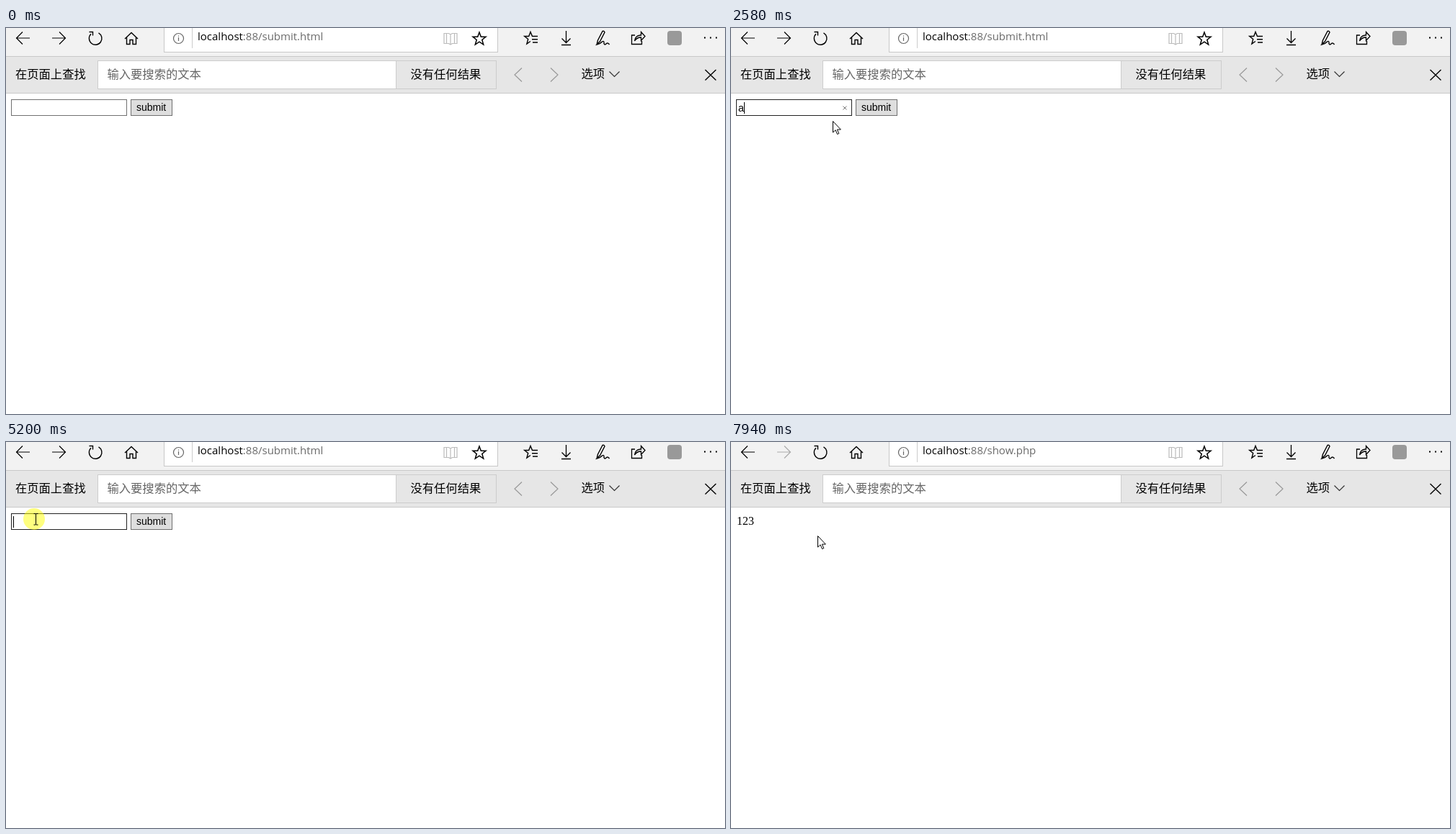
Write an HTML page that moves like this. It is 998 by 536 pixels and loops after 8 s.

```html
<!DOCTYPE html>
<html lang="zh">
<head>
<meta charset="utf-8">
<title>Form demo</title>
<style>
html, body { margin: 0; width: 100%; height: 100%; overflow: hidden; background: #fff; }
svg { display: block; width: 998px; height: 536px; }
text { white-space: pre; }
.ui { font: 15px "Open Sans", sans-serif; }
.zh { font: 16.3px "Noto Sans CJK SC", "Noto Sans CJK", sans-serif; }
.form { font: 14.4px "Liberation Sans", Arial, sans-serif; }
.page { font: 16px "Liberation Serif", serif; }
.icon { fill: none; stroke: #000; stroke-width: 1.2; }
.popup { filter: drop-shadow(0 2px 3px #0004); }
</style>
</head>
<body>
<svg viewBox="0 0 998 536">
  <!-- toolbar -->
  <rect width="998" height="39" fill="#f2f2f2"/>
  <rect y="39" width="998" height="52" fill="#c9c9c9"/>
  <rect y="40" width="998" height="50" fill="#e6e6e6"/>
  <rect id="backHover" x=".5" y="-5.5" width="47" height="43" fill="#dadada" stroke="#b0b0b0"/>
  <rect x="219.5" y="-5.5" width="463" height="39" fill="#fff" stroke="#c8c8c8"/>
  <path d="M258.5 0V28" stroke="#ccc"/>
  <g class="icon">
    <path d="M33 14H14.5M23 5.5L14.5 14l8.500 8.500"/>
    <path id="forward" d="M64 14H82.500M74 5.500l8.500 8.500-8.500 8.500"/>
    <path d="M128.500 6.800A8.800 8.800 0 1 1 118 8.200M115.500 5.500h5v5" stroke-width="1.400"/>
    <path d="M165 15l9-8.500 9 8.500M167.500 13v9.500h4.500v-6h4v6h4.500V13" stroke-width="1.400"/>
    <g stroke="#666"><circle cx="239.500" cy="14.500" r="7"/><path d="M239.500 13v5M239.500 10.500v1.300"/></g>
    <path d="M608 7.500h6.500l2.500 1.500 2.500-1.500h6.500v14h-6.500l-2.500 1.500-2.500-1.500H608zM617 9v14M611.500 8v13M622.500 8v13" stroke="#bbb"/>
    <path d="M657 6l2.300 6.200h6.700l-5.200 4.300 1.900 6.500-5.700-3.800-5.700 3.800 1.900-6.500-5.200-4.300h6.700z" stroke-width="1.500"/>
    <path d="M738 11.500H730.500L728 5.500l-2.300 6h-6l5 4-1.800 6.500 5-3.500M730 15.800h8M731 20h7" stroke-width="1.400"/>
    <path d="M777.500 4v16M771.500 14.500l6 6 6-6M771 23.500h13" stroke-width="1.300"/>
    <path d="M820 23l1.500-6 6.500-12.500q2-1 3 1.500L824.500 18.500 820 23q5-1 7.500-4 3-2 2.500 2.500 1 3 3.500 0 2-1.500 4 1.500" stroke-width="1.400"/>
    <path d="M873 10h-4.500v12.500h14V18M872.500 18q1-7.500 8-8h1V5.500l5.500 6-5.500 6V13q-6 0-9 5z" stroke-width="1.300"/>
    <path d="M716 55.500L706 65l10 9.500M756 55.500l10 9.500-10 9.500" stroke="#999"/>
    <path d="M837.500 60.500l7 7 7-7" stroke="#333"/>
    <path d="M970.500 58l15 14.500m0-14.500l-15 14.500" stroke-width="1.400"/>
  </g>
  <rect x="918" y="4" width="20" height="20" rx="4" fill="#999"/>
  <path d="M969 13.500h2m6 0h2m6 0h2" stroke="#000" stroke-width="2"/>
  <text class="ui" x="266" y="17">localhost<tspan id="path" fill="#6b6b6b"></tspan></text>

  <!-- find bar -->
  <rect x="127.500" y="45.500" width="414" height="39" fill="#fff" stroke="#ccc"/>
  <rect x="541.500" y="45.500" width="139" height="39" fill="#e6e6e6" stroke="#ccc"/>
  <g class="zh">
    <text x="13" y="70">在页面上查找</text>
    <text x="140.500" y="70" fill="#666">输入要搜索的文本</text>
    <text x="561.500" y="70">没有任何结果</text>
    <text x="798.500" y="69">选项</text>
  </g>

  <!-- page -->
  <text id="result" class="page" x="8" y="115"></text>
  <g id="form" class="form">
    <rect id="field" x="7.500" y="99.500" width="160" height="22"/>
    <text id="value" x="10" y="116"></text>
    <path id="caret" d="M0 103V119" stroke="#000"/>
    <path id="clear" d="M155.500 108.500l5 5m0-5l-5 5" stroke="#777"/>
    <rect x="173.500" y="99.500" width="57" height="22" fill="#dedede" stroke="#707070"/>
    <text x="181" y="115" style="font-size:14px">submit</text>
  </g>
  <g id="popup" class="popup ui">
    <rect id="panel" x="7.500" y="122.500" width="344" fill="#f2f2f2" stroke="#c4c4c4"/>
    <rect id="rows" x="12" y="125" width="335" fill="#fff"/>
    <g id="items" style="font-size:14px"></g>
  </g>
  <g id="status" class="popup">
    <rect x="3.500" y="502.500" width="200" height="30" fill="#e6e6e6" stroke="#d8d8d8"/>
    <text class="ui" x="8" y="523" fill="#767676" style="font-size:14.200px">http://localhost:88/show.php</text>
  </g>

  <!-- pointer -->
  <g id="pointer">
    <circle id="click" r="15" fill="#ff0" fill-opacity=".5"/>
    <path id="arrow" d="M.5 .5V16l3.600-3.300 2.500 5.800 2.200-1-2.400-5.500h5z" fill="#fff" stroke="#000"/>
    <path id="beam" d="M-.5-7.500h2.500l.500.500.500-.500h2.500M2.500-7V7.500M-.5 8h2.500l.500-.500.500.500h2.500" fill="none" stroke="#000"/>
  </g>
</svg>
<script>
const LOOP = 8000, STEP = 77, ROW = 40;
const $ = id => document.getElementById(id);
const set = (id, attrs) => { for (const k in attrs) $(id).setAttribute(k, attrs[k]); };
const show = (id, on) => { $(id).style.display = on ? '' : 'none'; };
const text = (id, s) => { if ($(id).textContent !== s) $(id).textContent = s; };
const within = (t, spans) => spans.some(([a, b]) => t >= a && t < b);
const clamp = v => Math.max(0, Math.min(1, v));

const history = ['a', 'd', 'f', 'hello', 's', 'test'];
history.forEach((word, i) => {
  const el = document.createElementNS('http://www.w3.org/2000/svg', 'text');
  el.textContent = word;
  el.setAttribute('x', 30);
  el.setAttribute('y', 148 + i * ROW);
  $('items').append(el);
});

// time, x, y
const moves = [
  [220, 761, 506], [990, 104, 123], [1070, 91, 113], [1390, 91, 113],
  [1960, 89, 145], [2300, 89, 145], [2800, 206, 110], [3200, 206, 110],
  [3740, 36, 107], [4200, 22, 22], [4500, 22, 22], [4810, 34, 88],
  [5130, 39, 107], [6360, 39, 107], [7150, 190, 114], [7300, 190, 114],
  [7940, 120, 130], [LOOP, 120, 130]
];
const clicks = [[1220, 1390], [2110, 2300], [2890, 3050], [4350, 4500], [5200, 5400], [7220, 7380]];
const typed = [[0, ''], [1700, 'a'], [2970, ''], [5820, '1'], [5970, '12'], [6120, '123']];

function pointerAt(t) {
  const i = moves.findIndex(m => m[0] > t);
  const [t0, x0, y0] = moves[i - 1], [t1, x1, y1] = moves[i];
  const k = Math.floor((t - t0) / STEP) * STEP / (t1 - t0);
  const e = k * k * (3 - 2 * k);
  return [Math.round(x0 + (x1 - x0) * e), Math.round(y0 + (y1 - y0) * e)];
}

function drawPointer(t, onForm) {
  show('pointer', t >= 220);
  if (t < 220) return;
  const [x, y] = pointerAt(t);
  const beam = onForm && x > 6 && x < 168 && y > 98 && y < 122;
  set('pointer', { transform: `translate(${x} ${y})` });
  show('beam', beam);
  show('arrow', !beam);
  show('click', within(t, clicks));
}

function drawForm(t) {
  const value = typed.filter(s => s[0] <= t).pop()[1];
  const preview = within(t, [[1960, 2300]]);
  const focus = within(t, [[1220, 2970], [5200, 7300]]) && !preview;
  set('field', {
    fill: preview ? '#e5f1fc' : '#fff',
    stroke: preview ? '#999' : focus ? '#222' : '#707070'
  });
  text('value', value);
  show('caret', focus);
  set('caret', { transform: `translate(${10.5 + 8 * value.length} 0)` });
  show('clear', focus && value);

  const count = within(t, [[1390, 1700], [5400, 5820]]) ? history.length
    : within(t, [[1700, 2300]]) ? 1 : 0;
  show('popup', count);
  set('panel', { height: count * ROW + 2 });
  set('rows', { height: count * ROW - 1, fill: preview ? '#c3daee' : '#fff' });
  [...$('items').children].forEach((el, i) => {
    el.style.display = i < count ? '' : 'none';
    el.style.fontWeight = count === 1 ? 700 : 400;
  });
}

function draw(t) {
  const onForm = within(t, [[0, 2970], [4500, 7300]]);
  text('path', onForm ? ':88/submit.html' : ':88/show.php');
  text('result', onForm ? '' : t < 4500 ? 'a' : '123');
  set('forward', { stroke: onForm ? '#000' : '#aaa' });
  show('backHover', within(t, [[3980, 4650]]));
  show('form', onForm);
  drawForm(t);
  const fade = (from, to) => clamp((t - from) / 150) * clamp((to - t) / 500);
  $('status').style.opacity = Math.max(fade(2700, 3550), fade(6950, 7880));
  drawPointer(t, onForm);
}

const start = performance.now();
function tick() {
  draw((performance.now() - start) % LOOP);
  requestAnimationFrame(tick);
}
tick();
</script>
</body>
</html>
```
